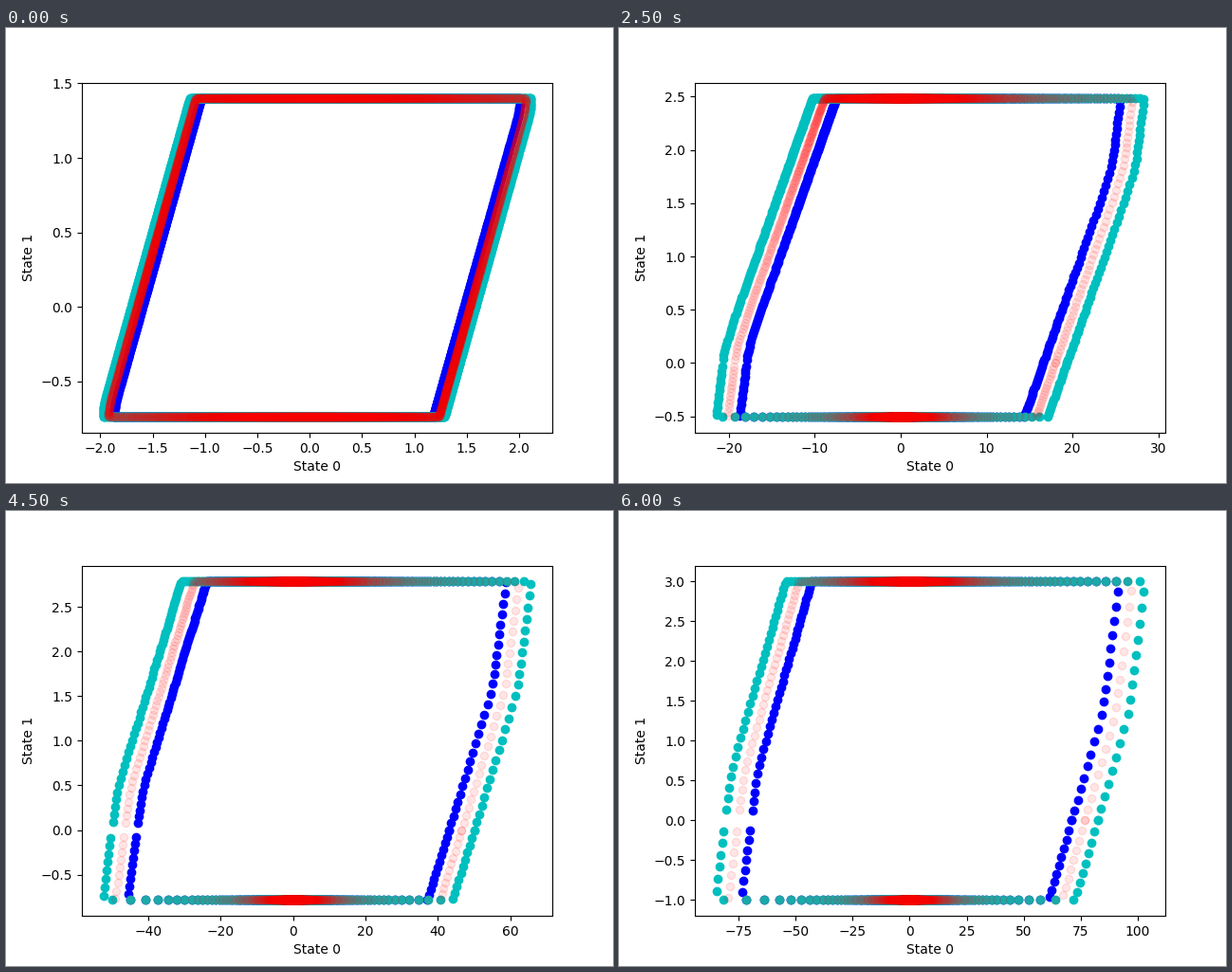
Animation of 640x480 px, one loop 6.25 s. Source, as a matplotlib script:

```python
import numpy as np
import matplotlib.pyplot as plt
from matplotlib.animation import FuncAnimation

FRAMES = 25
DT = 0.4

# Rays every 0.1 degree: 0 appears twice, 180 is left out
half = np.radians(np.arange(1800) * 0.1)
angles = np.concatenate([half, -half])
rays = np.stack([np.cos(angles), np.sin(angles)])


def center(t):
    return np.array([t - 1 + np.exp(-t), 1 - np.exp(-t)])


def side(t):
    """Right side, top to bottom, as (drop in x, drop in y) from the top corner."""
    s = np.append(t, np.linspace(min(1.4, 0.95 * t), 0, 5))
    lag = t - s
    fade, end = np.exp(-s), np.exp(-t)
    dx = 0.09 * lag**2 + 0.2 * (fade * (lag - 1) + end)
    dy = 0.18 * lag + 0.2 * (fade - end)
    return np.append(dx, dx[-1] + 2 * t), np.append(dy, dy[-1] + 2)


def polygon(t, margin):
    """Corners of the reachable set, widened by a horizontal margin."""
    dx, dy = side(t)
    flat = 1 + 1.2 * t + 0.602 * t**2 + margin
    right = np.stack([flat + dx[-1] / 2 - dx, dy[-1] / 2 - dy], axis=1)
    return np.concatenate([right, -right]) + center(t)


def boundary(corners):
    """Points where the rays from the origin leave a convex polygon."""
    edge = np.roll(corners, -1, axis=0) - corners
    normal = np.stack([-edge[:, 1], edge[:, 0]], axis=1)
    offset = np.sum(normal * corners, axis=1)[:, None]
    along = normal @ rays
    outward = along * np.sign(offset) > 1e-12
    dist = np.full(along.shape, np.inf)
    np.divide(np.broadcast_to(offset, along.shape), along, out=dist, where=outward)
    return rays * dist.min(axis=0)


fig, ax = plt.subplots(figsize=(6.4, 4.8), dpi=100)


def draw(frame):
    t = DT * (frame + 1)
    gap = 0.11 * t + 0.046 * t**2
    ax.clear()
    ax.scatter(*boundary(polygon(t, -gap)), color="b")
    ax.scatter(*boundary(polygon(t, gap)), color="c")
    ax.scatter(*boundary(polygon(t, 0)), color="r", alpha=0.1)
    ax.set_xlabel("State 0")
    ax.set_ylabel("State 1")


anim = FuncAnimation(fig, draw, frames=FRAMES, init_func=lambda: None,
                     interval=250, repeat=True, repeat_delay=0)
plt.show()
```
